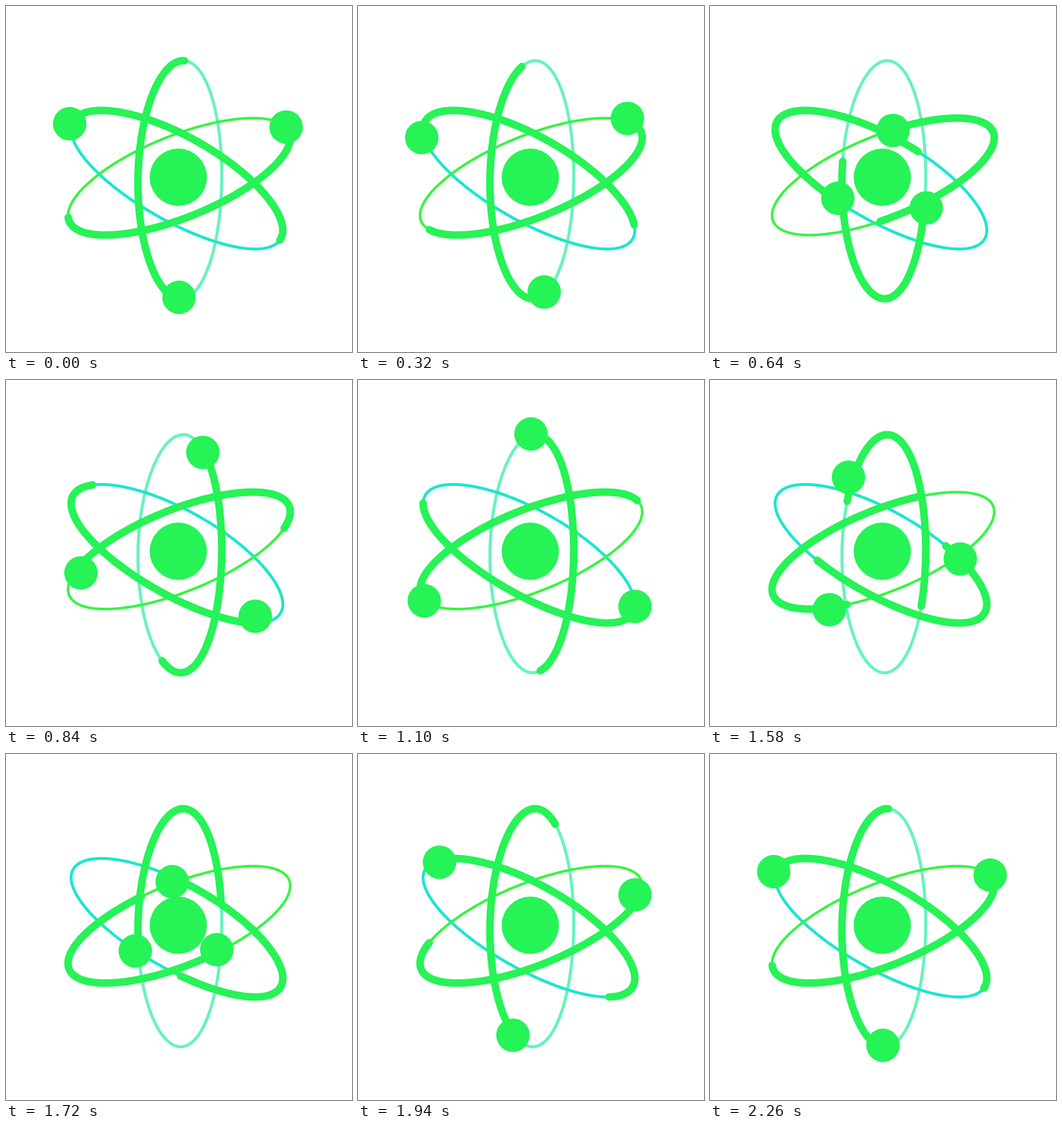
These frames come from a looping animation (500 px wide and 500 px high, 2280 ms). An HTML page with a canvas:

```html
<!DOCTYPE html>
<html lang="en">
<head>
<meta charset="utf-8">
<title>Atom</title>
<style>
  html, body { margin: 0; width: 100%; height: 100%; overflow: hidden; background: #fff; }
  canvas { display: block; width: 500px; height: 500px; }
</style>
</head>
<body>
<canvas id="stage" width="500" height="500"></canvas>
<script>
const ctx = document.getElementById('stage').getContext('2d');
const LOOP = 2280, TURN = 1100, GREEN = '#26f356', STEPS = 720;

// Closed, slightly bent ellipse traced counter-clockwise from the end of its
// major axis that points along `angle`; returns a lookup by arc fraction.
function orbit(cx, cy, a, b, angle, bend = 0) {
  const phi = angle * Math.PI / 180;
  const cos = Math.cos(phi), sin = Math.sin(phi);
  const points = [], lengths = [0];
  for (let i = 0; i <= STEPS; i++) {
    const theta = i / STEPS * 2 * Math.PI;
    const u = a * Math.cos(theta);
    const v = -b * Math.sin(theta) + bend * Math.cos(theta) ** 2;
    const p = [cx + u * cos - v * sin, cy + u * sin + v * cos];
    if (i) {
      const q = points[i - 1];
      lengths.push(lengths[i - 1] + Math.hypot(p[0] - q[0], p[1] - q[1]));
    }
    points.push(p);
  }
  const total = lengths[STEPS];
  return fraction => {
    const length = (fraction - Math.floor(fraction)) * total;
    let lo = 0, hi = STEPS;
    while (hi - lo > 1) {
      const mid = (lo + hi) >> 1;
      if (lengths[mid] <= length) lo = mid; else hi = mid;
    }
    const k = (length - lengths[lo]) / (lengths[hi] - lengths[lo]);
    return points[lo].map((n, axis) => n + (points[hi][axis] - n) * k);
  };
}

const atoms = [
  { color: '#68f2be', width: 4.4, start: -0.002,
    ring: orbit(251.2, 251, 172, 60.5, -89.3, 3),
    ball: orbit(250, 249.5, 171.5, 64.5, 90) },
  { color: '#1ce6cc', width: 4.2, start: -0.003,
    ring: orbit(248, 249.8, 172.3, 61, 29.5, 2),
    ball: orbit(246.2, 248.6, 173, 55.5, 207) },
  { color: '#34f541', width: 3.7, start: -0.007,
    ring: orbit(250.2, 246.5, 171.5, 59.2, 158),
    ball: orbit(250.3, 247, 170.5, 56.5, -25) }
];

function ease(x, [x1, x2]) {
  let lo = 0, hi = 1;
  for (let i = 0; i < 24; i++) {
    const v = (lo + hi) / 2, w = 1 - v;
    if (3 * x1 * v * w * w + 3 * x2 * v * v * w + v ** 3 < x) lo = v; else hi = v;
  }
  return lo * lo * (3 - 2 * lo);
}

// Two eased half-turns; `half` is the fraction reached at the turning time.
function travel(t, { half, first, second }) {
  return t < TURN
    ? half * ease(t / TURN, first)
    : half + (1 - half) * ease((t - TURN) / (LOOP - TURN), second);
}

const trailMotion = { half: 0.52, first: [0.825, 0.465], second: [0.633, 0.349] };
const ballMotion = { half: 0.5, first: [0.85, 0.47], second: [0.752, 0.256] };

function strokeArc(path, from, to, color, width) {
  const n = Math.ceil((to - from) * 400);
  ctx.beginPath();
  for (let i = 0; i <= n; i++) ctx.lineTo(...path(from + (to - from) * i / n));
  ctx.strokeStyle = color;
  ctx.lineWidth = width;
  ctx.stroke();
}

function disc(x, y, r) {
  ctx.beginPath();
  ctx.arc(x, y, r, 0, 2 * Math.PI);
  ctx.fillStyle = GREEN;
  ctx.fill();
}

function draw(t) {
  ctx.fillStyle = '#fff';
  ctx.fillRect(0, 0, 500, 500);
  ctx.lineCap = ctx.lineJoin = 'round';
  const trail = travel(t, trailMotion);
  const head = travel(t, ballMotion);
  for (const { ring, color, width } of atoms) strokeArc(ring, 0, 1, color, width);
  for (const { ring, start } of atoms) {
    strokeArc(ring, start + trail, start + trail + 0.5, GREEN, 10.9);
  }
  disc(249, 247.5, 41.4);
  for (const { ball } of atoms) disc(...ball(head), 24.2);
}

const begin = performance.now();
function frame() {
  draw((performance.now() - begin) % LOOP);
  requestAnimationFrame(frame);
}
frame();
</script>
</body>
</html>
```
